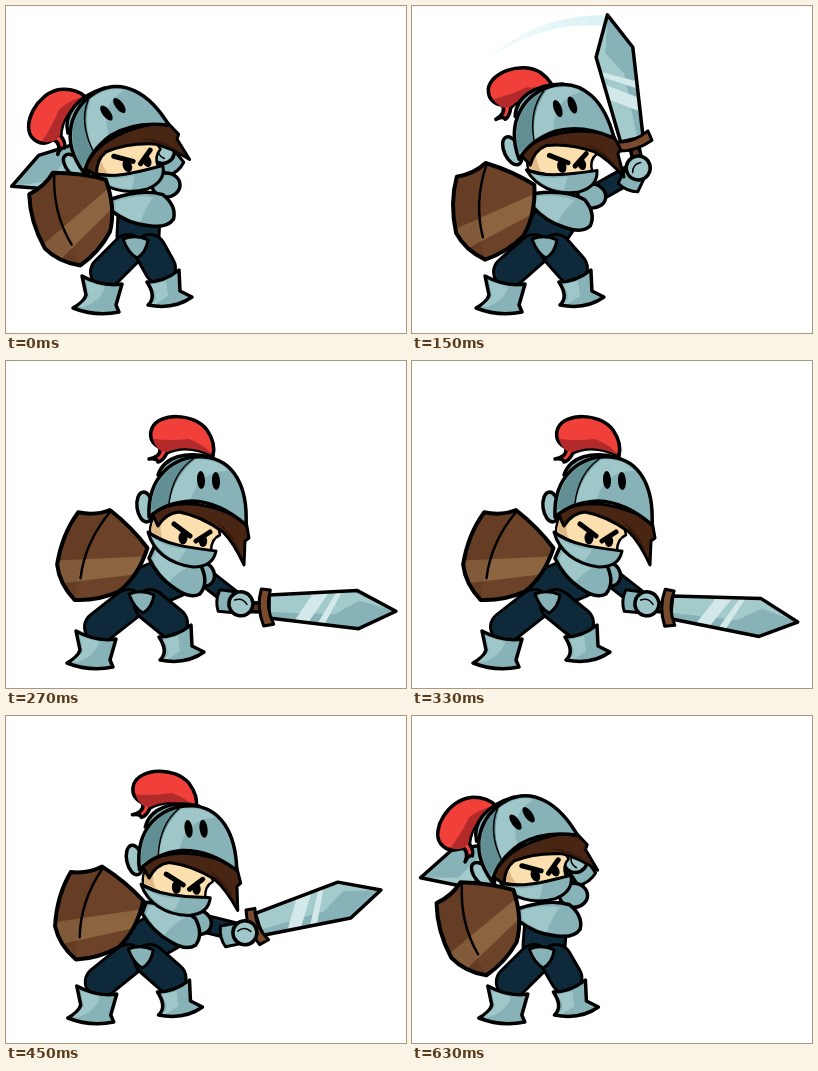
These frames come from a looping animation (400x327 px, 0.66 s). An HTML page with a canvas:

```html
<!DOCTYPE html>
<html>
<head>
<meta charset="utf-8">
<title>Knight swinging a sword</title>
<style>
html, body { margin: 0; overflow: hidden; background: #fff; }
canvas { display: block; }
</style>
</head>
<body>
<canvas id="stage" width="400" height="327"></canvas>
<script>
const ctx = document.getElementById('stage').getContext('2d');
const LOOP = 660, STEP = 30, RAD = Math.PI / 180;
const LIGHT = '#9fc7ca', STEEL = '#87b2b7', SHADE = '#618f94', NAVY = '#0e2a3a';

const clamp = u => Math.min(1, Math.max(0, u));
const smooth = u => u * u * (3 - 2 * u);

// 0 is wound up, 1 is fully struck.
function lunge(t) {
  return t < 270 ? (t / 270) ** 1.2 : 1 - smooth(clamp((t - 390) / 270));
}

// A path through the wound, middle and struck poses, each [x, y, degrees].
const arc = (wound, middle, struck) => s => wound.map((a, i) =>
  2 * (s - 0.5) * (s - 1) * a + 4 * s * (1 - s) * middle[i] + 2 * s * (s - 0.5) * struck[i]);

const poses = {
  head: arc([122, 148, -34], [155, 148, -17], [190, 165, 0]),
  face: arc([131, 157, -22], [160, 159, -15], [187, 178, 0]),
  plume: arc([50, 109, -62], [110, 83, -19], [177, 78, 0]),
  shield: arc([67, 212, -10], [80, 206, 7], [92, 197, 28]),
  hand: arc([158, 148, -120], [225, 165, -55], [232, 242, 15]),
  sword: arc([127, 131, -203], [222, 138, -101], [259, 246, 1]),
  chest: arc([138, 206, -4], [151, 207, 8], [171, 213, 24]),
  pad: arc([160, 179, 0], [180, 190, 10], [195, 213, 30])
};

function swordPose(t) {
  const s = lunge(t), [x, y, angle] = poses.sword(s);
  const settle = s * smooth(clamp((t - 270) / 120));
  return [x - 7 * settle, y + settle, angle + 9 * settle];
}

function shape(d, fill, width = 3.5) {
  const path = new Path2D(d);
  if (fill) { ctx.fillStyle = fill; ctx.fill(path); }
  if (width) { ctx.lineWidth = width; ctx.stroke(path); }
}

function oval(x, y, rx, ry, fill, width = 3.5, angle = 0) {
  ctx.beginPath();
  ctx.ellipse(x, y, rx, ry, angle * RAD, 0, 7);
  ctx.fillStyle = fill;
  ctx.fill();
  if (width) { ctx.lineWidth = width; ctx.stroke(); }
}

function limb(from, to, width) {
  const d = `M${from[0]} ${from[1]}L${to[0]} ${to[1]}`;
  shape(d, null, width + 6);
  ctx.strokeStyle = NAVY;
  shape(d, null, width);
  ctx.strokeStyle = '#000';
}

function place([x, y, angle = 0], draw, px = 0, py = 0) {
  ctx.save();
  ctx.translate(x, y);
  ctx.rotate(angle * RAD);
  ctx.translate(-px, -py);
  draw();
  ctx.restore();
}

function swoosh(t) {
  if (t < 150 || t > 240) return;
  const at = (age, r) => {
    const [x, y, angle] = swordPose(t - age * 2.8);
    return [x + r * Math.cos(angle * RAD), y + r * Math.sin(angle * RAD)];
  };
  for (let k = 0; k < 24; k++) {
    const fade = 1 - k / 24, inner = 131 - 11 * fade;
    ctx.fillStyle = `rgba(190,232,235,${0.6 * fade})`;
    ctx.fill(new Path2D('M' + [at(k, 131), at(k + 1, 131), at(k + 1, inner), at(k, inner)].join('L') + 'Z'));
  }
}

function sword() {
  shape('M-30-4H0V5H-30Z', '#5b3420');
  const blade = 'M4-12L92-18L131 2L94 20L4 11Z';
  shape(blade, '#a4cbcc', 0);
  shape('M4 5L70 6L94-8L131 2L94 20L4 11Z', STEEL, 0);
  shape('M48-15L64-16L44 14L30 13ZM71-16L77-17L60 16L53 15Z', '#d3e8e8', 0);
  shape(blade);
  shape('M-4-18L5-17Q0 0 9 17L-1 19Q-9 0-4-18Z', '#7a4a2c', 3);
}

function hand() {
  shape('M-21-8L-6-10L-4 11L-17 13Q-23 4-21-8Z', STEEL, 3);
  oval(3, 0, 12, 12, LIGHT);
  shape('M-4-2Q3-7 9-1', null, 1.5);
}

function chest() {
  shape('M-32-15Q0-24 20-16Q33-4 29 9Q22 18 4 14Q-16 11-32-3Z', STEEL);
  shape('M-28-13Q-6-18 10-14Q0-2-4 10Q-18 6-28-4Z', LIGHT, 0);
}

function boots(left, right) {
  place([left, 0], () => {
    shape('M76 270Q96 281 116 278L110 299L113 306Q90 311 67 302Q78 296 80 289Z', STEEL);
    shape('M80 275L99 281Q96 294 78 301L72 301L83 291Z', LIGHT, 0);
  });
  place([right, 0], () => {
    shape('M141 276Q158 276 173 264L174 285L186 291Q168 304 142 299Q151 291 141 276Z', STEEL);
    shape('M145 279L160 275L162 290L150 298L146 298Q154 291 145 279Z', LIGHT, 0);
  });
}

function plume() {
  shape('M-34 20Q-22 18-23 9Q-36 2-31-11C-24-26 10-27 24-9Q33 4 30 17Q4 4-16 14Q-20 22-25 23Q-26 19-34 20Z', '#f04039');
  shape('M-30 0Q-12 2 6 0Q22 6 29 16Q4 4-16 13L-22 12Q-28 8-30 0Z', '#b22a2a', 0);
}

function face() {
  shape('M144 172Q143 150 170 142L210 154L214 174Q205 178 205 190L182 192Z', '#fbdfae', 2.5);
  shape('M145 170Q147 152 158 147Q152 162 156 177Z', '#dfba86', 0);
  shape('M142 171C158 184 186 187 210 190Q207 206 187 206C163 203 147 190 142 171Z', STEEL, 3);
  shape('M146 176C157 185 168 187 180 188Q176 197 172 200Q153 192 146 176Z', LIGHT, 0);
  oval(177, 177, 4.5, 6.5, '#000', 0);
  oval(197, 180, 4.2, 6, '#000', 0);
  shape('M168 163L184 175M190 180L204 171', null, 5);
}

function helmet() {
  shape('M146 152Q182 130 240 160L243 177L239 180L238 204Q228 182 217 171Q195 155 173 151Q160 152 152 165Z', '#492513', 3);
  shape('M210 160Q226 170 235 192Q226 176 210 160Z', '#34170c', 0);
  oval(139, 146, 8, 15, LIGHT, 3.5, -8);
  shape('M152 114C158 96 180 89 207 97L204 106Z', STEEL);
  const dome = 'M143 156C141 114 169 94 199 96C228 99 242 126 240 164Q214 141 186 140Q160 141 143 156Z';
  shape(dome, STEEL, 0);
  shape('M145 150C146 116 169 99 190 98Q169 113 163 144Q152 147 145 150Z', SHADE, 0);
  shape('M190 98Q215 99 222 110Q194 108 184 140Q173 140 163 144Q169 113 190 98Z', LIGHT, 0);
  shape(dome);
  shape('M187 98Q167 112 163 142', null, 1.5);
  oval(195, 119, 4, 9, '#000', 0, -3);
  oval(210, 120, 4, 9, '#000', 0, -3);
}

function shield() {
  const board = 'M-39-31Q-22-36-12-48Q16-43 39-32Q44-2 34 20Q20 38-1 48Q-22 41-33 25Q-43-4-39-31Z';
  shape(board, '#6c4328', 0);
  ctx.save();
  ctx.clip(new Path2D(board));
  shape('M-46 28L45-26V-6L-30 46Z', '#8d6440', 0);
  shape('M-12-48Q-20 2-1 48L-50 40V-50Z', 'rgba(45,20,8,.12)', 0);
  ctx.restore();
  shape(board, null, 4);
  shape('M-11-46Q-19-8-6 26', null, 2.5);
}

function render(t) {
  const s = lunge(t), at = name => poses[name](s);
  const body = at('chest'), left = -6 * s, right = 12 * s;
  ctx.clearRect(0, 0, 400, 327);
  ctx.lineJoin = ctx.lineCap = 'round';

  swoosh(t);
  place(swordPose(t), sword);
  limb(at('pad'), at('hand'), 14);
  place(at('hand'), hand);
  limb([body[0] - 5, body[1] + 3], [132, 230], 39);
  limb([122, 244], [100 + left, 266], 28);
  limb([144, 244], [154 + right, 262], 28);
  boots(left, right);
  place([right / 2, 0], () => shape('M117 233Q130 228 142 234Q140 247 131 252Q122 247 117 233Z', STEEL, 3));
  place(at('pad'), () => oval(0, 0, 14, 12, STEEL));
  place(body, chest);
  place(at('plume'), plume);
  place(at('face'), face, 187, 178);
  place(at('head'), helmet, 190, 165);
  place(at('shield'), shield);
}

function frame() {
  render(Math.floor(performance.now() % LOOP / STEP) * STEP);
  requestAnimationFrame(frame);
}
frame();
</script>
</body>
</html>
```
